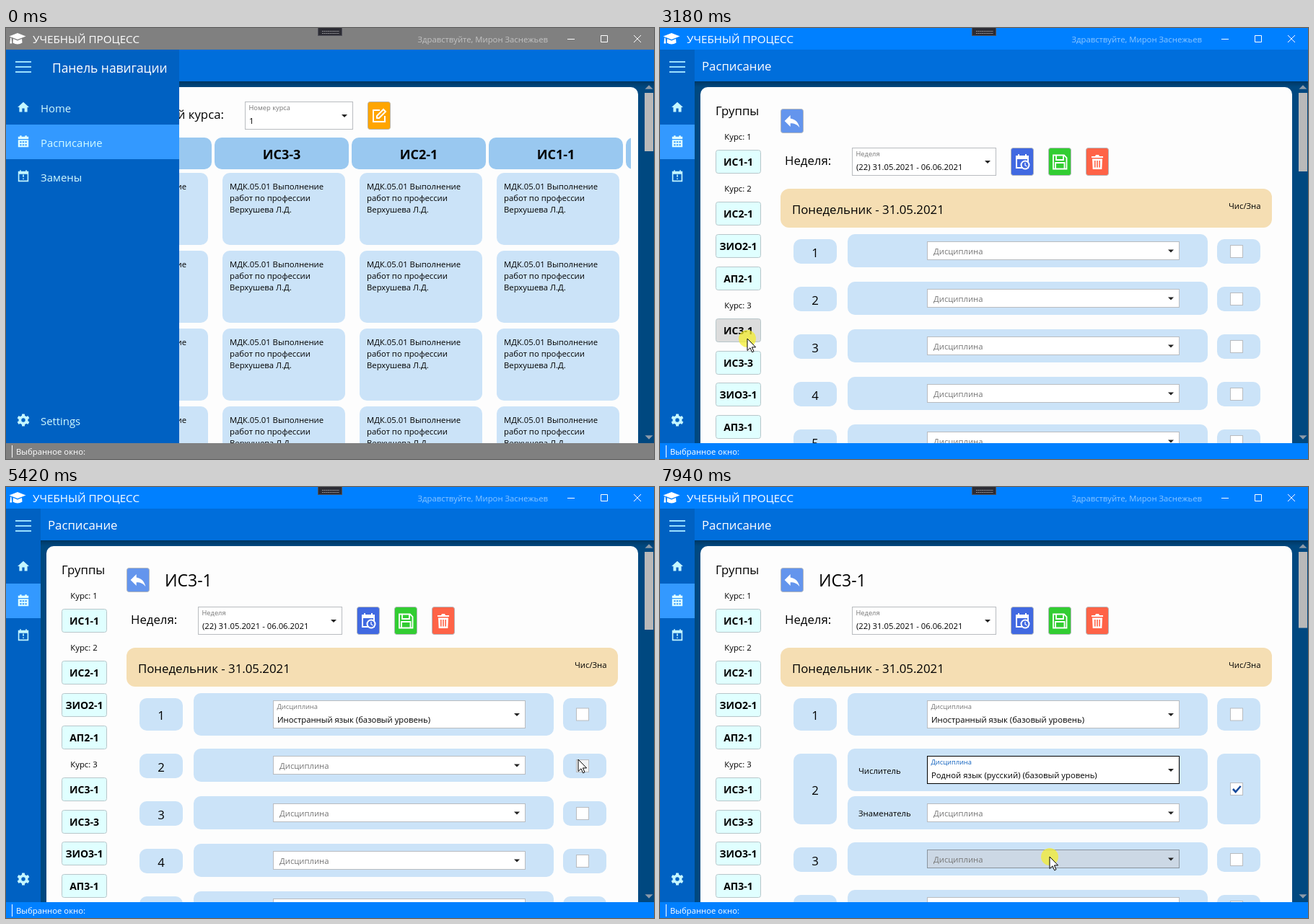
An HTML page for the animation above (8 s loop, 898 px wide and 598 px high).

```html
<!DOCTYPE html>
<html lang="ru">
<head>
<meta charset="utf-8">
<title>Учебный процесс</title>
<style>
  html, body { margin: 0; width: 100%; height: 100%; overflow: hidden; background: #004880; }
  svg { display: block; }
  text { font-family: "Open Sans", "Noto Sans", sans-serif; }
</style>
</head>
<body>
<svg id="stage" width="898" height="598" viewBox="0 0 898 598">
  <defs>
    <linearGradient id="shade" x2="0" y2="1">
      <stop offset="0" stop-color="#003763"/><stop offset="1" stop-color="#004880"/>
    </linearGradient>
  </defs>
  <rect width="898" height="598" fill="#004880"/>
  <rect y="74" width="898" height="8" fill="url(#shade)"/>
  <rect x="56" y="82" width="820" height="530" rx="10" fill="#fdfdfd"/>
  <g id="page"></g>
  <g id="frame"></g>
  <g id="popup"></g>
  <circle id="flash" r="12" fill="#f4ee30" opacity=".75"/>
  <path id="cursor" d="M0 0V16.5L4 12.8L6.6 18.8L9 17.7L6.4 11.9H11.6Z" fill="#fff" stroke="#000"/>
</svg>
<script>
const LOOP = 8000, BODY = 11.3, HEAD = 16.8, LABEL = 9.3;
const CELL = '#cbe3f8', SKY = '#99c8f0', HOT = '#ccd8e5';
const DIGIT_DROP = 7.5;

const icons = {
  cap: 'M.5 8.5L12 4L23.5 8.5L12 13ZM6 12L12 14.5L18 12L18.5 17.5Q12 21.5 5.5 17.5ZM2.2 10.5H3.4L4.2 18.5H1.4Z',
  home: 'M10 20V14H14V20H19V12H22L12 3L2 12H5V20Z',
  calendar: 'M3 3H6V1H8V3H16V1H18V3H21V21H3ZM5 8V19H19V8Z',
  days: 'M3 3H6V1H9V3H15V1H18V3H21V7H3ZM3 8.5H21V21H3ZM6 11h3v2.5h-3zm4.5 0h3v2.5h-3zm4.5 0h3v2.5h-3zM6 16h3v2.5h-3zm4.5 0h3v2.5h-3zm4.5 0h3v2.5h-3z',
  alert: 'M11 9h2v4h-2zm0 6h2v2h-2z',
  reply: 'M10 9V5L3 12L10 19V14.9C15 14.9 18.5 16.5 21 20C20 15 17 10 10 9Z',
  trash: 'M4 4H9L10 2H14L15 4H20V6H4ZM5 7.5H19L18.3 22H5.7ZM8 10v9.5h1.6v-9.5zm3.2 0v9.5h1.6v-9.5zm3.2 0v9.5h1.6v-9.5z'
};

const subjects = [
  'Русский язык (базовый уровень)', 'Литература (базовый уровень)',
  'Родной язык (русский) (базовый уровень)', 'Иностранный язык (базовый уровень)',
  'Математика (профильный) (углубленный уровень)', 'Основы философии', 'История',
  'Психология общения', 'Элементы высшей математики', 'Операционные системы и среды',
  'Архитектура аппаратных средств', 'Информационные технологии',
  'Разработка программных модулей', 'Поддержка и тестирование программных модулей',
  'Разработка мобильных приложений', 'Учебная практика'
];

// time, x, y of the pointer
const path = [
  [60, 600, 420], [330, 560, 284], [780, 521, 118], [1450, 521, 118], [2200, 440, 192],
  [2940, 121, 431], [3260, 121, 431], [3760, 440, 310], [4050, 440, 310], [4200, 425, 381],
  [4260, 425, 381], [4440, 430, 403], [4620, 430, 403], [5420, 793, 378], [5560, 796, 384],
  [5760, 796, 384], [6430, 566, 382], [6740, 566, 382], [7140, 545, 458], [7340, 545, 458],
  [7840, 540, 513]
];
const clicks = [330, 1010, 3180, 3990, 4510, 5650, 6600, 7220, 7940];

// when each drop-down list opens and closes
const SLIDE = 180, FIRST = [4020, 4560], SECOND = [6672, 7270];

const clamp = v => Math.max(0, Math.min(1, v));
const ease = (t, from, to) => { const k = clamp((t - from) / (to - from)); return k * k * (3 - 2 * k); };
const within = (t, from, to) => t >= from && t < to;
const mix = (a, b, k) => a + (b - a) * k;

const rect = (x, y, w, h, fill, r = 0, more = '') =>
  `<rect x="${x}" y="${y}" width="${w}" height="${h}" rx="${r}" fill="${fill}" ${more}/>`;
const boxed = (x, y, w, h, fill, stroke = '#b9bcc0', r = 0, sw = 1) =>
  rect(x + sw / 2, y + sw / 2, w - sw, h - sw, fill, r, `stroke="${stroke}" stroke-width="${sw}"`);
const text = (x, y, str, size = BODY, fill = '#000', more = '') =>
  `<text x="${x}" y="${y}" font-size="${size}" fill="${fill}" ${more}>${str}</text>`;
const mid = (x, y, str, size, fill, bold) =>
  text(x, y, str, size, fill, `text-anchor="middle" ${bold ? 'font-weight="700"' : ''}`);
const icon = (d, cx, cy, fill = '#fff', s = 1) =>
  `<path d="${d}" fill="${fill}" fill-rule="evenodd" transform="translate(${cx - 12 * s} ${cy - 12 * s}) scale(${s})"/>`;
const line = (d, stroke, w = 1, more = '') =>
  `<path d="${d}" fill="none" stroke="${stroke}" stroke-width="${w}" ${more}/>`;
const arrow = (x, y, fill = '#222', dir = 1, s = 4) =>
  `<path d="M${x - s} ${y - dir * s / 2}h${2 * s}l${-s} ${dir * s}z" fill="${fill}"/>`;

function pointer(t) {
  const i = path.findIndex(p => p[0] > t);
  if (i < 0) return path.at(-1).slice(1);
  if (!i) return path[0].slice(1);
  const [a, b] = [path[i - 1], path[i]], k = ease(t, a[0], b[0]);
  return [mix(a[1], b[1], k), mix(a[2], b[2], k)];
}

function combo(over, x, y, w, { label, value = '', e = 1, open, focus }) {
  const h = 26 + 13 * e, dark = open || focus;
  const hot = open || over(x, y, w, h);
  return boxed(x, y, w, h, hot ? HOT : '#fff', dark ? '#000' : hot ? '#8a949e' : '#b9bcc0') +
    text(x + mix(9, 5.5, e), y + mix(18, 12, e), label, mix(BODY, LABEL, e),
      focus && !open ? '#1565c0' : '#777') +
    (value && text(x + 6, y + 31, value)) +
    arrow(x + w - 12, y + h / 2 + .5);
}

function planPage(t, over) {
  let s = text(81, 126, 'Расписание занятий курса:', HEAD) +
    combo(over, 331, 102, 150, { label: 'Номер курса', value: '1' });
  const hot = over(501, 102, 32, 39), focus = t >= 1070;
  s += boxed(501, 102, 32, 39, hot ? '#dcdcdc' : '#ffa500', focus ? '#000' : '#b9b3a8', 3, focus ? 2 : 1) +
    `<g transform="translate(505 110)">${line('M13 4H4V20H20V12M9 15V12L18 3L21 6L12 15Z', '#fff', 2)}</g>`;
  s += '<svg x="66" y="82" width="800" height="494" viewBox="66 82 800 494">' +
    rect(66, 151, 30, 460, '#87cefa', 10);
  for (let i = 0; i < 4; i++) s += mid(83, 213 + 113 * i, i + 1);
  [...'Понедельник'].forEach((c, i) => s += text(66, 359 + 16 * i, c));
  ['ИС3-1', 'ИС3-3', 'ИС2-1', 'ИС1-1', 'АП1-1'].forEach((name, i) => {
    const x = 99 + 190 * i;
    s += rect(x, 152, 186, 44, SKY, 10) + mid(x + 93, 182, name, 18, '#000', true);
    for (let j = 0; j < 4; j++) {
      const y = 201 + 108 * j;
      s += rect(x + 11, y, 170, 100, CELL, 10);
      ['МДК.05.01 Выполнение', 'работ по профессии', 'Верхушева Л.Д.']
        .forEach((str, k) => s += text(x + 21, y + 23 + 16 * k, str));
    }
  });
  return s + '</svg>';
}

function sidebar(over) {
  let s = text(77, 121, 'Группы', HEAD);
  [151, 223, 385].forEach((y, i) => s += mid(108, y + 4, 'Курс: ' + (i + 1)));
  const tops = [169, 241, 286, 331, 403, 448, 492, 537];
  ['ИС1-1', 'ИС2-1', 'ЗИО2-1', 'АП2-1', 'ИС3-1', 'ИС3-3', 'ЗИО3-1', 'АП3-1'].forEach((name, i) => {
    const y = tops[i];
    s += boxed(77, y, 63, 33, over(77, y, 63, 33) ? '#dcdcdc' : '#e0ffff', '#b7c6ca', 3) +
      mid(108.5, y + 22, name, 14, '#000', true);
  });
  return s;
}

function toolbar(t, over) {
  const tool = (x, y, h, fill, art) =>
    boxed(x, y, 32, h, over(x, y, 32, h) ? '#dcdcdc' : fill, '#b4b8bd', 3) + art;
  return tool(167, 112, 34, '#6495ed', icon(icons.reply, 183, 129, '#fff', 1.15)) +
    (t >= 3240 ? text(220, 138, 'ИС3-1', 23) : '') +
    text(173, 190, 'Неделя:', HEAD) +
    combo(over, 266, 166, 200, { label: 'Неделя', value: '(22) 31.05.2021 - 06.06.2021' }) +
    tool(486, 166, 39, '#4169e1', icon(icons.calendar, 502, 186) +
      '<circle cx="506" cy="190" r="5.5" fill="#4169e1" stroke="#fff" stroke-width="2"/>' +
      line('M506 187v3.5l2.5 1.5', '#fff', 1.3)) +
    tool(538, 166, 39, '#32cd32',
      line('M545 176.5H560L563.5 180V195.5H545ZM549 177V183H559V177M548 195V187H560.5V195', '#fff', 1.8)) +
    tool(590, 166, 39, '#ff6347', icon(icons.trash, 606, 186));
}

function lesson(over, n, y, e, split, opts) {
  const h = split ? 84 + 14 * e : 34 + 11 * e, cy = y + 7 + h / 2, low = y + 52 + 14 * e;
  const field = (top, o) => combo(over, 370, top + 10, 350, { label: 'Дисциплина', e: 0, ...o });
  let s = rect(185, y + 7, 60, h, CELL, 10) + mid(215, cy + DIGIT_DROP, n, HEAD) +
    rect(260, y, 499, 46 + 13 * e, CELL, 10) + field(y, { e, ...opts }) +
    rect(772, y + 7, 60, h, CELL, 10) +
    boxed(790, cy - 9, 18, 18, over(790, cy - 9, 18, 18) ? '#f1f3f5' : '#fff');
  if (split) s += text(275, y + 27.5 + 7 * e, 'Числитель') +
    rect(260, low, 499, 46, CELL, 10) + text(275, low + 28, 'Знаменатель') + field(low, {}) +
    line(`M794 ${cy}l3.7 4l7-8`, '#174a9c', 2.6);
  return s;
}

function editPage(t, over, st) {
  let s = sidebar(over) + toolbar(t, over) +
    rect(167, 223, 681, 54, '#f5deb3', 12) +
    text(183, 258, 'Понедельник - 31.05.2021', HEAD) + text(788, 251, 'Чис/Зна');
  let y = 286;
  for (let n = 1; n <= 5 && y < 576; n++) {
    const e = n === 1 ? st.e1 : n === 2 ? st.e2 : 0, split = n === 2 && st.split;
    const opts = n === 1 ? { value: e ? subjects[3] : '', open: st.open === 1, focus: within(t, 3990, 4840) }
      : n === 2 ? { value: e ? subjects[2] : '', open: st.open === 2, focus: t >= 6600 } : {};
    s += lesson(over, n, y, e, split, opts);
    y += split ? 116 + 14 * e : 66 + 11 * e;
  }
  return s;
}

function list(top, k, y) {
  const hot = k < 1 ? -1 : Math.floor((y - top - 2) / 22), h = Math.round(360 * k);
  let s = `<svg x="370" y="${top}" width="350" height="${h}">` + rect(0, 0, 350, h, '#fff') +
    `<g transform="translate(0 ${h - 360})">`;
  subjects.forEach((name, i) => {
    if (i === hot) s += rect(2, 2 + 22 * i, 332, 22, SKY);
    s += text(4, 18 + 22 * i, name);
  });
  return s + rect(336, 17, 12, 236, '#b5b5b5') + arrow(342, 9, '#999', -1, 5) +
    arrow(342, 351, '#999', 1, 5) + '</g>' + boxed(0, 0, 350, h, 'none', '#9a9a9a') + '</svg>';
}

function gear(cx, cy, fill) {
  let s = `<circle cx="${cx}" cy="${cy}" r="4.6" fill="none" stroke="${fill}" stroke-width="3.8"/>`;
  for (let a = 0; a < 360; a += 60)
    s += rect(cx - 2, cy - 8.6, 4, 4, fill, .6, `transform="rotate(${a} ${cx} ${cy})"`);
  return s;
}

// title bar, navigation, scroll bar and status line
function chrome(active, nav, thumb) {
  const bar = active ? '#0080ff' : '#808080', pale = '#c4f6ff';
  let s = rect(0, 30, 898, 44, '#006edb') + text(58, 59, 'Расписание', HEAD, '#fff') +
    arrow(891, 82, '#8c9aa8', -1, 5.5) + rect(885, 90, 12, thumb - 90, '#b9b9b9') +
    arrow(891, 568, '#8c9aa8', 1, 5.5);
  s += `<svg width="${nav}" height="576">` + rect(0, 30, 240, 546, '#0061c2') +
    rect(0, 134, 240, 48, '#3399ff') +
    line('M13 47h22M13 54h22M13 61h22', '#9be0ff', 2) +
    icon(icons.home, 24, 110, pale, .8) +
    icon(icons.days, 24, 158, '#e0ffff', .8) +
    icon(icons.calendar + icons.alert, 24, 206, pale, .8) + gear(24, 544, pale);
  if (nav > 48) {
    s += text(64, 62, 'Панель навигации', 17.4, '#fff');
    [['Home', 117], ['Расписание', 165], ['Замены', 213], ['Settings', 551]]
      .forEach(([str, y]) => s += text(48, y, str, 14.9, '#d2fbff'));
  }
  s += '</svg>' + rect(0, 0, 898, 30, bar) + icon(icons.cap, 16, 15) +
    text(37, 21, 'УЧЕБНЫЙ ПРОЦЕСС', 15.2, '#fff') +
    text(751, 20, 'Здравствуйте, Мирон Заснежьев', BODY, active ? '#8cc6ff' : '#c2c2c2', 'text-anchor="end"') +
    line('M778 15.5h10M824.5 10.5h9v9h-9zM870 10l10 10M880 10l-10 10', '#fff') +
    boxed(432, -1, 34, 12, '#2c2c34', '#50505a') +
    line('M438 4.5h24M438 7.5h24', '#a8a8ac', 1, 'stroke-dasharray="1 .6"');
  return s + rect(0, 576, 898, 22, bar) + line('M8.5 579v17', '#fff') +
    text(14, 592, 'Выбранное окно:', BODY, '#fff');
}

const $ = id => document.getElementById(id);
const cache = {};
function put(id, html) {
  if (cache[id] !== html) $(id).innerHTML = cache[id] = html;
}

function draw(t) {
  const [x, y] = pointer(t), shown = t >= 60;
  const st = {
    e1: ease(t, 4560, 4740), e2: ease(t, 7270, 7420), split: t >= 5680,
    open: within(t, ...FIRST) ? 1 : within(t, ...SECOND) ? 2 : 0
  };
  const over = (l, top, w, h) => shown && !(st.open && y > 400) &&
    x >= l && x < l + w && y >= top && y < top + h;
  const edit = t >= 1450;

  put('page', edit ? editPage(t, over, st) : planPage(t, over));
  put('frame', chrome(t >= 60, mix(240, 48, ease(t, 330, 600)),
    edit ? 199 - st.e1 - 1.5 * st.split - st.e2 : 171));
  put('popup', st.open === 1 ? list(322, clamp((t - FIRST[0]) / SLIDE), y)
    : st.open === 2 ? list(399, clamp((t - SECOND[0]) / SLIDE), y) : '');

  const at = `translate(${x.toFixed(1)} ${y.toFixed(1)})`;
  $('cursor').setAttribute('transform', at);
  $('cursor').style.display = shown ? '' : 'none';
  $('flash').setAttribute('transform', at);
  $('flash').style.display = clicks.some(c => within(t, c, c + 60)) ? '' : 'none';
}

const start = performance.now();
function tick() {
  draw((performance.now() - start) % LOOP);
  requestAnimationFrame(tick);
}
tick();
</script>
</body>
</html>
```
